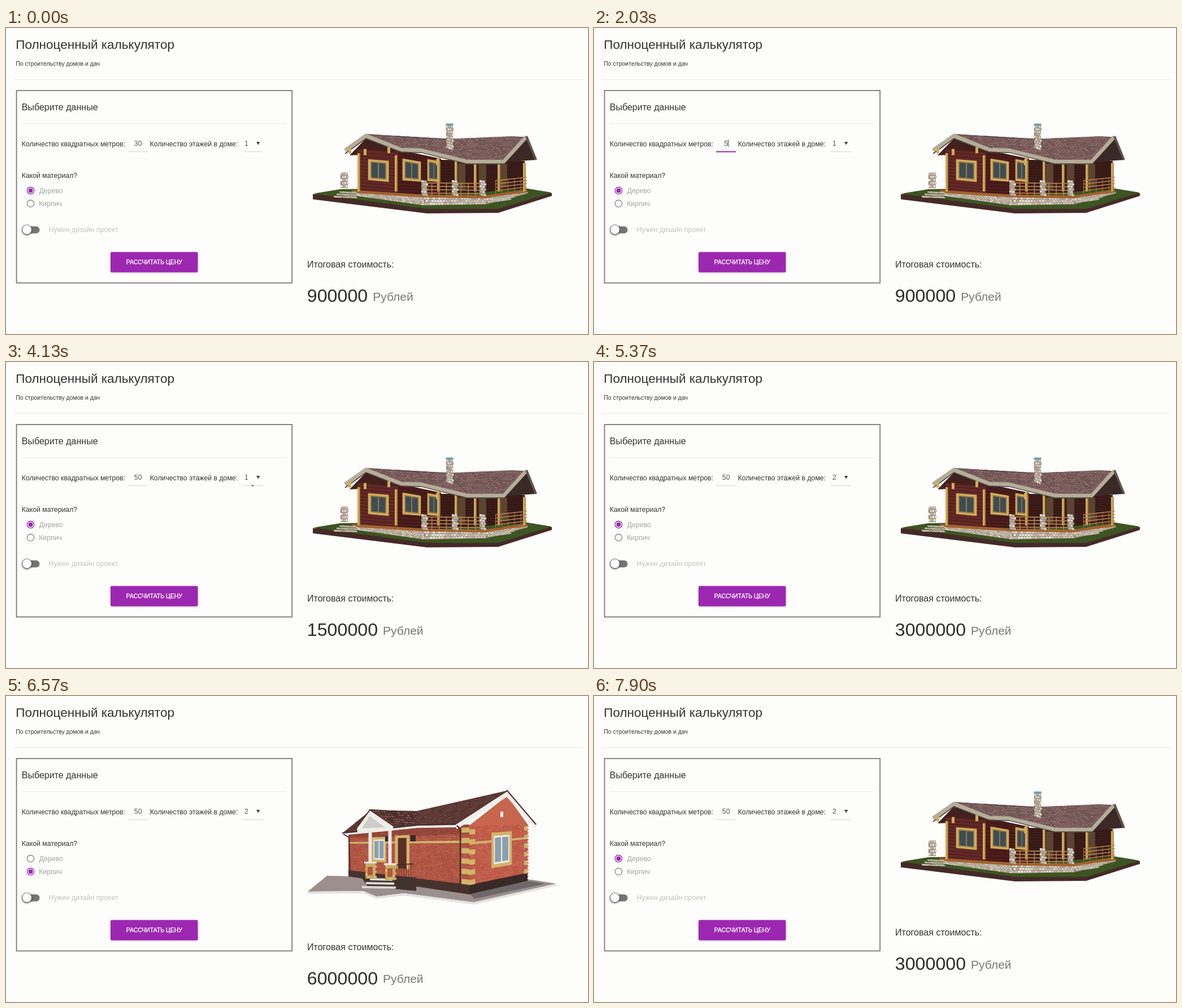
An HTML page with a canvas for the animation above (8 s loop, 1030x543 px).

```html
<!DOCTYPE html>
<html lang="ru">
<head>
<meta charset="utf-8">
<title>Калькулятор</title>
<style>
html, body { margin: 0; width: 100%; height: 100%; overflow: hidden; background: #fdfdfc; }
canvas, svg { position: absolute; left: 0; top: 0; display: block; }
text { font-family: "Liberation Sans", Arial, sans-serif; font-size: 12.28px; fill: #333; white-space: pre; }
.h1 { font-size: 22.56px; }
.h2 { font-size: 16.05px; }
.sub { font-size: 10.5px; }
.soft { fill: #a4a4a4; }
.faint { fill: #c3c3ba; font-size: 12.35px; }
.field { fill: #555; }
.btn { fill: #fff; font-size: 10.4px; stroke: #fff; stroke-width: .35px; }
.price { font-size: 32.2px; fill: #2d2d2d; }
.unit { font-size: 21px; fill: #777; }
</style>
</head>
<body>
<canvas id="stage" width="1030" height="543"></canvas>
<svg width="1030" height="543" viewBox="0 0 1030 543">
  <text class="h1" x="17.2" y="37">Полноценный калькулятор</text>
  <text class="sub" x="17.3" y="67">По строительству домов и дач</text>
  <text class="h2" x="27.7" y="146">Выберите данные</text>
  <text x="27.8" y="210">Количество квадратных метров:</text>
  <text id="area" class="field" x="233.7" y="209" text-anchor="middle">30</text>
  <text x="254.7" y="210">Количество этажей в доме:</text>
  <text id="floors" class="field" x="422" y="209">1</text>
  <text x="27.8" y="265.5">Какой материал?</text>
  <text class="soft" x="58.7" y="293">Дерево</text>
  <text class="soft" x="58.2" y="316">Кирпич</text>
  <text class="faint" x="75.5" y="361.5">Нужен дизайн проект</text>
  <text class="btn" x="262.3" y="418.7" text-anchor="middle">РАССЧИТАТЬ ЦЕНУ</text>
  <g id="menu">
    <text class="field" x="422" y="234">1</text>
    <text class="field" x="422" y="251">2</text>
    <text class="field" x="422" y="268">3</text>
  </g>
  <g id="total">
    <text class="h2" x="533" y="425">Итоговая стоимость:</text>
    <text class="price" x="532.8" y="486"><tspan id="price">900000</tspan> <tspan class="unit" dy="-2.5">Рублей</tspan></text>
  </g>
</svg>
<script>
const LOOP = 8000, PURPLE = '#9c27b0';
const $ = id => document.getElementById(id);
const ctx = $('stage').getContext('2d');
const clamp = p => Math.min(1, Math.max(0, p));
const easeOut = p => 1 - Math.pow(1 - clamp(p), 1.7);
const mix = (a, b, p) => a + (b - a) * p;

function layer(paint) {
  const c = document.createElement('canvas');
  c.width = 1030; c.height = 543;
  paint(brush(c.getContext('2d')));
  return c;
}

// A wall seen in perspective: maps u, v in 0..1 to the stage
const plane = (x0, x1, top0, top1, low0, low1) => (u, v) =>
  [mix(x0, x1, u), mix(mix(top0, top1, u), mix(low0, low1, u), v)];

function brush(g) {
  let seed = 7;
  const rnd = () => (seed = seed * 16807 % 2147483647) / 2147483647;
  const parse = s => s.split(' ').map(p => p.split(',').map(Number));
  const trace = pts => {
    g.beginPath();
    pts.forEach(p => g.lineTo(...p));
  };
  const fill = (color, pts) => { trace(pts); g.fillStyle = color; g.fill(); };
  const poly = (color, s) => fill(color, parse(s));
  const line = (color, width, s) => {
    trace(parse(s));
    g.strokeStyle = color; g.lineWidth = width; g.stroke();
  };
  const rect = (color, x, y, w, h) => { g.fillStyle = color; g.fillRect(x, y, w, h); };
  const patch = (color, wall, u = 0, v = 0, w = 1, h = 1) =>
    fill(color, [wall(u, v), wall(u + w, v), wall(u + w, v + h), wall(u, v + h)]);

  // Staggered cells with slightly varying lightness
  const masonry = (wall, hue, sat, light, vary, cols, rows) => {
    patch(`hsl(${hue} ${sat}% ${light - vary}%)`, wall);
    for (let r = 0; r < rows; r++)
      for (let c = 0; c < cols; c++) {
        const l = light + (rnd() - .4) * vary;
        patch(`hsl(${hue} ${sat}% ${l}%)`, wall, (c + r % 2 / 2) / cols, r / rows, .85 / cols, .8 / rows);
      }
  };
  const stone = wall => {
    const [x0, y0] = wall(0, 0), [x1, y1] = wall(1, 1);
    masonry(wall, 34, 16, 75, 26, Math.ceil((x1 - x0) / 5), Math.max(2, Math.round(Math.abs(y1 - y0) / 5)));
  };
  const inside = (s, paint) => {
    g.save(); trace(parse(s)); g.clip(); paint(); g.restore();
  };
  const pane = (wall, u, v, w, h, frame, sash, glass) => {
    const part = (color, a, b, c, d) => patch(color, wall, u + a * w, v + b * h, c * w, d * h);
    part(frame, 0, 0, 1, 1);
    part(sash, .12, .1, .76, .8);
    for (const a of [.17, .53]) part(glass, a, .15, .3, .7);
  };
  const railing = (wall, color, rails, posts) => {
    for (let i = 0; i < rails; i++) patch(color, wall, 0, i / rails, 1, .07);
    for (let i = 0; i < posts; i++) patch(color, wall, i / posts, 0, .015, 1);
  };
  return { poly, line, rect, patch, masonry, stone, inside, pane, railing };
}

const woodHouse = layer(({ poly, line, rect, patch, masonry, stone, inside, pane, railing }) => {
  const left = plane(622, 694, 214, 220, 288, 295);
  const middle = plane(694, 770, 216, 232, 295, 296);
  const porch = plane(770, 918, 234, 236, 296, 286);
  const GOLD = '#d2ab59';

  poly('#452a28', '543,295 966,293 966,298 871,328 745,329 543,304');
  poly('#3c5522', '543,294 592,286 905,282 966,292 871,321 745,321');

  poly('#42201d', '608,226 637,196 702,222');
  [[left, '#622927'], [middle, '#4b1d1c'], [porch, '#3b1d1a']].forEach(([wall, color]) => {
    patch(color, wall);
    for (let v = 0; v < 1; v += .08) patch('rgba(20,0,0,.3)', wall, 0, v, 1, .018);
  });
  pane(left, .26, .23, .51, .5, GOLD, '#8d7a4a', '#3e4b52');
  pane(middle, .1, .18, .43, .5, GOLD, '#8d7a4a', '#3e4b52');
  pane(middle, .68, .08, .3, .57, GOLD, '#8d7a4a', '#3e4b52');
  for (let u = .2; u < .9; u += .25) patch('#5b4431', porch, u, .1, .09, .8);

  stone(plane(620, 740, 290, 299, 298, 315));
  stone(plane(740, 850, 300, 302, 315, 313));
  stone(plane(850, 922, 302, 288, 313, 294));
  line('#a3622f', 5, '612,290 738,298 848,300 922,289');
  for (let i = 0; i < 3; i++) {
    const y = i * 4;
    stone(plane(590 - i * 5, 620, 290 + y, 291 + y, 293 + y, 294 + y));
    stone(plane(862 - i * 5, 905 - i * 6, 300 + y, 294 + y, 303 + y, 297 + y));
  }

  for (const x of [622, 688, 763, 794, 828, 870, 915]) {
    const top = 222 + (x - 622) * .06;
    rect(GOLD, x, top, 4.5, 290 - top);
    rect('#987034', x + 3.5, top, 1.2, 290 - top);
  }
  railing(plane(740, 843, 274, 275, 298, 299), '#b1834c', 4, 8);
  railing(plane(866, 922, 270, 264, 294, 287), '#b1834c', 4, 5);
  for (const x of [735, 789, 838]) stone(plane(x, x + 10, 270, 271, 297, 299));
  stone(plane(592, 605, 257, 256, 284, 284));

  // Roof and its eaves
  poly('#3a2926', '881,238 921,194 938,234');
  inside('637,188 782,197 921,191 880,238 817,237 735,216 701,215', () =>
    masonry(plane(630, 930, 178, 194, 232, 246), 2, 14, 45, 12, 50, 17));
  line('#4f393b', 1, '690,192 782,197 817,235');
  line('#4e4941', 2, '600,223 637,196 699,220 736,221 816,241 882,241');
  line('#b5ad99', 6.5, '600,217 637,191 700,216 735,217 816,237 881,237 921,193');
  line('#5d574e', 4, '921,192 938,234');
  for (const x of [606, 633, 675, 761]) rect(GOLD, x, 215 - Math.abs(x - 637) * .1 + (x > 700) * 30, 5, 11);

  stone(plane(779, 791, 173, 173, 213, 218));
  rect('#6f9eab', 778.5, 169.5, 13, 4);
});

const brickHouse = layer(({ poly, line, rect, patch, masonry, inside, pane, railing }) => {
  const front = plane(606, 820, 241, 228, 320, 352);
  const side = plane(820, 923, 232, 227, 352, 328);
  const GOLD = '#d3b36b', WHITE = '#efeeeb', DARK = '#492e2a';

  const edge = '534,349 632,348 656,358 704,352 828,368 974,335';
  poly('#9b908e', '534,347 568,319 930,326 974,333 828,366 704,350 656,356 632,346');
  line('#e4e2e0', 4, edge);
  poly('#6f686a', '822,352 922,328 955,333 829,360');

  poly('#c7654f', '812,236 887,177 924,229 820,240');
  masonry(front, 10, 45, 50, 7, 42, 32);
  masonry(side, 10, 50, 54, 7, 22, 34);
  patch('rgba(60,20,20,.25)', front, 0, 0, 1, .14);
  for (const [wall, dark] of [[front, '#46322d'], [side, '#382a28']]) {
    patch(GOLD, wall, 0, .23, 1, .035);
    patch(dark, wall, 0, .86, 1, .14);
  }
  for (let v = .04; v < .8; v += .15) {
    patch(GOLD, front, .935, v, .065, .075);
    patch(GOLD, side, 0, v, .1, .075);
    patch(GOLD, side, .94, v, .06, .075);
  }
  pane(front, .195, .14, .117, .49, GOLD, WHITE, '#8ba0ad');
  pane(side, .38, .11, .35, .56, GOLD, WHITE, '#8ba0ad');
  patch(GOLD, front, .385, .12, .12, .6);
  patch('#592f27', front, .41, .17, .07, .55);

  inside('645,203 728,204 887,168 797,229 728,231 640,240 596,243', () =>
    masonry(plane(596, 890, 214, 150, 276, 212), 8, 27, 31, 8, 50, 22));
  line(WHITE, 4, '596,245 640,241 728,232 800,231');
  line(DARK, 2, '595,243 640,239 728,229 798,227');
  line(WHITE, 8, '796,233 887,174 938,231');
  line('#563630', 2.2, '794,227 887,168 938,228');
  rect(WHITE, 875, 205, 5, 10);
  line(DARK, 2.5, '798,230 804,236 804,346');
  line(DARK, 2, '597,245 607,251 609,316');

  // Porch
  inside('644,201 728,206 723,231 684,231', () =>
    masonry(plane(640, 730, 198, 204, 230, 236), 8, 25, 33, 18, 18, 8));
  poly(WHITE, '644,203 621,234 622,243 684,239 686,230');
  poly('#cfcdcb', '643,213 630,235 671,233');
  line('#563630', 2, '620,235 644,202 686,231');
  poly('#43332f', '630,323 690,319 726,322 726,346 640,338');
  for (let i = 0; i < 3; i++) line('#dcd9d6', 4, `${644 - i * 7},${325 + i * 7} ${684 + i * 3},${326 + i * 7}`);
  railing(plane(691, 721, 299, 297, 322, 320), '#332827', 1, 7);
  for (const x of [636, 671]) {
    const y = 296 + (x - 636) * .08;
    rect('#e9e8e5', x + 5.5, 238, 6, 60);
    masonry(plane(x, x + 18, y, y, y + 28, y + 28), 42, 50, 62, 12, 3, 6);
    rect('#b0583f', x + 4, y + 7, 9, 15);
    rect('#ece7df', x - 2, y - 2, 22, 3);
  }
  rect('#322b29', 716, 247, 9, 11);
  rect('#322b29', 671, 249, 5, 9);
});

function box(color, x, y, w, h) {
  ctx.fillStyle = color;
  ctx.fillRect(x, y, w, h);
}
function pill(color, x, y, w, h, r) {
  ctx.fillStyle = color;
  ctx.beginPath(); ctx.roundRect(x, y, w, h, r); ctx.fill();
}
function disc(color, x, y, r) {
  ctx.fillStyle = color;
  ctx.beginPath(); ctx.arc(x, y, r, 0, 7); ctx.fill();
}
function ring(color, x, y, r) {
  ctx.strokeStyle = color; ctx.lineWidth = 1.15;
  ctx.beginPath(); ctx.arc(x, y, r, 0, 7); ctx.stroke();
}
function shadow(blur, dy, color) {
  ctx.shadowBlur = blur; ctx.shadowOffsetY = dy; ctx.shadowColor = color;
}

function radio(y, on) {
  ring('#757575', 43.5, y, 6.2);
  ctx.globalAlpha = on;
  ring(PURPLE, 43.5, y, 6.2);
  ctx.globalAlpha = 1;
  if (on > 0) disc(PURPLE, 43.5, y, 4 * on);
}

function underline(x, grow) {
  box('#d2d2d2', x, 219, 35, 1);
  if (grow > 0) box(PURPLE, x + 17.5 * (1 - grow), 218.5, 35 * grow, 2);
}

function setText(id, value) {
  if ($(id).textContent !== value) $(id).textContent = value;
}

function draw(t) {
  const brick = t >= 6400 && t < 7700;
  const toBrick = t < 7670 ? easeOut((t - 6362) / 208) : 1 - easeOut((t - 7662) / 238);
  const menuOpen = t >= 4200 && t < 5000;
  const area = t < 2030 ? '30' : t < 2370 ? '5' : '50';

  box('#fdfdfc', 0, 0, 1030, 543);
  box('#ecece8', 14, 91, 1008, 1);
  ctx.strokeStyle = '#767676'; ctx.lineWidth = 1.75;
  ctx.strokeRect(18.6, 111, 487.6, 341.4);
  box('#ebebe8', 28, 169, 468, 1);

  underline(216, t >= 970 && t < 2900 ? easeOut((t - 955) / 275) : 0);
  underline(419, t >= 4130 && t < 5370 ? easeOut((t - 4115) / 300) : 0);
  if (t >= 2030 && t < 2900) box('#444', area === '5' ? 237 : 241, 198, 1, 13);
  ctx.fillStyle = '#444';
  ctx.beginPath();
  ctx.moveTo(443, 202); ctx.lineTo(449.5, 202); ctx.lineTo(446.2, 207.5);
  ctx.fill();

  radio(288.5, 1 - toBrick);
  radio(311.5, toBrick);

  pill('#747474', 30, 352, 29.5, 12.5, 6.2);
  shadow(3, 1, 'rgba(0,0,0,.5)');
  disc('#666', 37, 358, 9);
  shadow(0, 0, 'transparent');
  disc('#fff', 37, 357.8, 8);

  shadow(3, 1, 'rgba(120,40,140,.3)');
  pill(PURPLE, 185, 397.5, 154.5, 36, 2.5);
  shadow(0, 0, 'transparent');

  ctx.drawImage(brick ? brickHouse : woodHouse, 0, 0);

  const hover = t < 4570 ? 0 : 1;
  if (menuOpen) {
    box('#8a8a8a', 419, 220.5, 35, 53);
    box('#fff', 420, 221.5, 33, 51);
    box('#1e90ff', 420, 221.5 + hover * 17, 33, 17);
  }
  const menu = $('menu');
  menu.style.display = menuOpen ? '' : 'none';
  [...menu.children].forEach((row, i) => { row.style.fill = i === hover ? '#fff' : ''; });

  setText('area', area);
  setText('floors', t < 5000 ? '1' : '2');
  const rate = t >= 6370 && t < 7670 ? 60000 : 30000;
  const size = t < 2900 ? 30 : 50;
  setText('price', String(size * rate * (t < 5000 ? 1 : 2)));
  $('total').setAttribute('transform', `translate(0 ${brick ? 25.5 : 0})`);
}

const start = performance.now();
function tick() {
  draw((performance.now() - start) % LOOP);
  requestAnimationFrame(tick);
}
tick();
</script>
</body>
</html>
```
